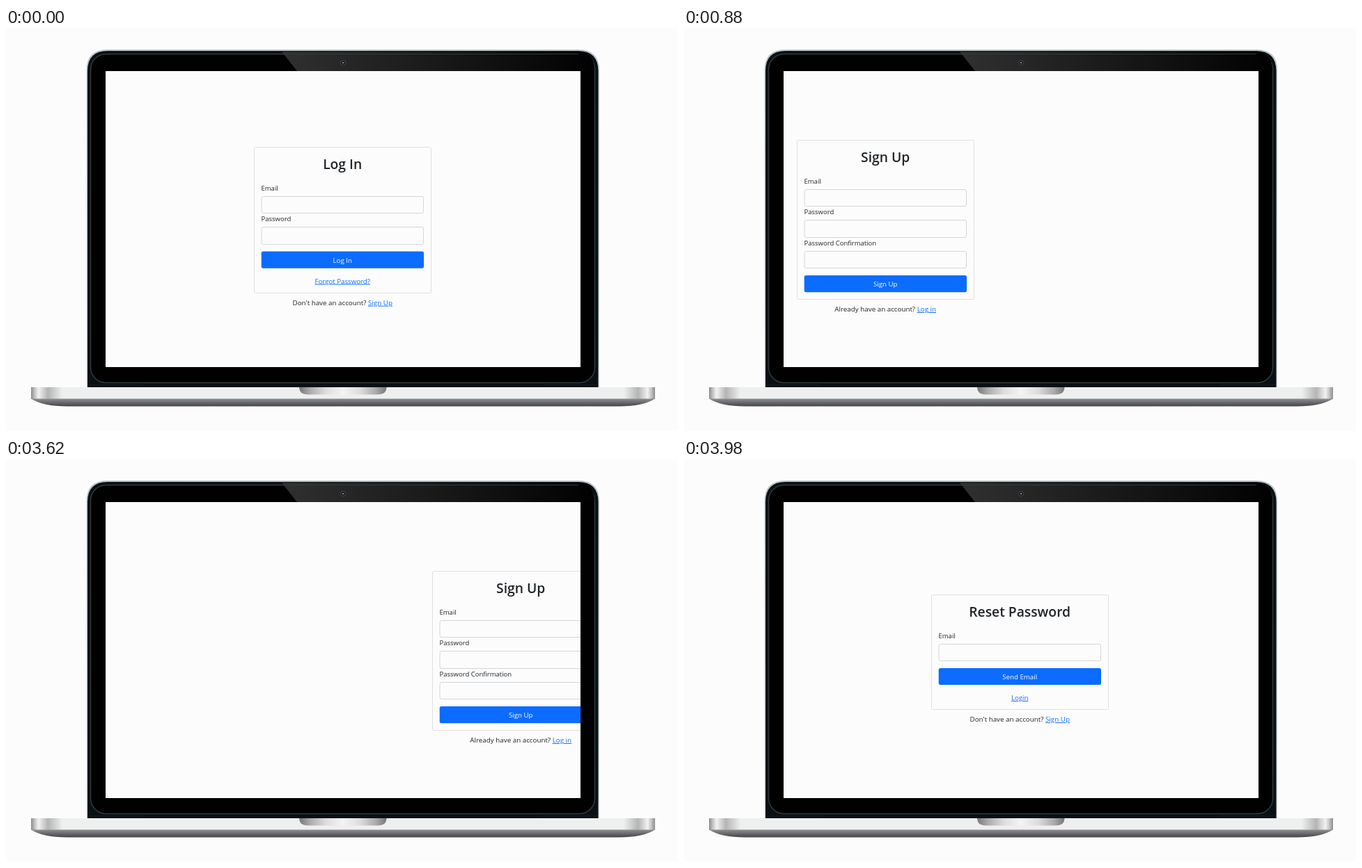
An HTML page for the animation above (6.04 s loop, 965 by 580 pixels).

```html
<!DOCTYPE html>
<html lang="en">
<head>
<meta charset="utf-8">
<title>Sign-in pages on a laptop</title>
<style>
  html, body { margin: 0; width: 100%; height: 100%; overflow: hidden; background: #fcfcfc; }
  svg { display: block; width: 965px; height: 580px; }
  text { font-family: "Open Sans", "Noto Sans", sans-serif; fill: #212529; }
  .title { font-size: 19.3px; font-weight: 600; }
  .label { font-size: 9.5px; }
  .action { font-size: 9.7px; fill: #fff; }
  .foot { font-size: 9.8px; }
  .link { font-size: 9.7px; }
  .link, .foot tspan { fill: #0d6efd; text-decoration: underline; }
  .title, .action, .foot, .link { text-anchor: middle; }
  .card { fill: none; stroke: #dfdfdf; }
  .field { fill: #fcfcfc; stroke: #d2d6da; }
  .button { fill: #0b6cff; }
</style>
</head>
<body>
<svg viewBox="0 0 965 580">
  <defs>
    <clipPath id="screen"><rect x="143" y="62" width="682" height="426"/></clipPath>
    <linearGradient id="glare">
      <stop offset="0" stop-color="#303030"/>
      <stop offset=".45" stop-color="#1b1b1b"/>
      <stop offset="1" stop-color="#010101"/>
    </linearGradient>
    <linearGradient id="edge" x1="0" y1="0" x2="0" y2="1">
      <stop offset="0" stop-color="#b9c3c3"/>
      <stop offset="1" stop-color="#d3d9dc"/>
    </linearGradient>
    <linearGradient id="deck">
      <stop offset="0" stop-color="#8c8c8c"/>
      <stop offset=".006" stop-color="#c4c4c4"/>
      <stop offset=".012" stop-color="#f2f2f2"/>
      <stop offset=".027" stop-color="#b4b4b4"/>
      <stop offset=".05" stop-color="#eeefef"/>
      <stop offset=".95" stop-color="#eeefef"/>
      <stop offset=".973" stop-color="#b4b4b4"/>
      <stop offset=".988" stop-color="#f2f2f2"/>
      <stop offset=".994" stop-color="#c4c4c4"/>
      <stop offset="1" stop-color="#8c8c8c"/>
    </linearGradient>
    <linearGradient id="under" x1="0" y1="0" x2="0" y2="1">
      <stop offset="0" stop-color="#8e8f91"/>
      <stop offset="1" stop-color="#434447"/>
    </linearGradient>
    <linearGradient id="notch">
      <stop offset="0" stop-color="#777"/>
      <stop offset=".12" stop-color="#aaa"/>
      <stop offset=".3" stop-color="#dcdcdc"/>
      <stop offset=".5" stop-color="#f4f4f4"/>
      <stop offset=".7" stop-color="#dcdcdc"/>
      <stop offset=".88" stop-color="#aaa"/>
      <stop offset="1" stop-color="#777"/>
    </linearGradient>
  </defs>

  <!-- lid -->
  <path d="M115.5 517V61Q115.5 31 145.5 31H822Q852 31 852 61V517Z" fill="url(#edge)"/>
  <path d="M117 517V62Q117 33 146 33H821.5Q850.5 33 850.5 62V517Z" fill="#0a1115"/>
  <rect x="121.5" y="37.5" width="724" height="473" rx="22" fill="#010101" stroke="#33393c" stroke-width="1.5"/>
  <path d="M396 34H822Q843 35 845 58V62H418Z" fill="url(#glare)"/>
  <path d="M146 37.5H822" stroke="#353a3c" stroke-width="1"/>
  <circle cx="484" cy="50" r="4" fill="#3a3b40"/>
  <circle cx="484" cy="50" r="2.6" fill="#15161b"/>
  <circle cx="484" cy="50" r="1.1" fill="#a4a5b0"/>
  <path d="M117 513.5H197M771 513.5H850" stroke="#10191e"/>

  <!-- base -->
  <rect x="36" y="517" width="896" height="17" fill="url(#deck)"/>
  <path d="M36 533.5H932Q915 544.5 880 544.5H88Q53 544.5 36 533.5Z" fill="url(#under)"/>
  <path d="M421 517H546.5Q546 527.5 534 527.5H433.500Q421.500 527.5 421 517Z" fill="url(#notch)"/>

  <rect x="143" y="62" width="682" height="426" fill="#fcfcfc"/>
  <g id="pages" clip-path="url(#screen)"></g>
</svg>
<script>
const LOOP = 6040, STEP = 20, STEPS = 25, UNITS = 30, TRAVEL = 965;
const SLIDES = [500, 3500];

const snap = v => Math.floor(v) + 0.5;
const text = (cls, x, y, str) => `<text class="${cls}" x="${x}" y="${y}">${str}</text>`;
const outline = (cls, x, y, w, bottom) =>
  `<rect class="${cls}" x="${x + 0.5}" y="${snap(y)}" width="${w}" height="${snap(bottom) - snap(y)}" rx="2.5"/>`;

function page({ left, top, title, fields, action, link, foot, footLink }) {
  const inner = left + 10.5, mid = left + 127.2;
  const buttonTop = top + 60.9 + 44.6 * fields.length;
  const bottom = buttonTop + (link ? 60 : 34.8);
  const rows = fields.map((name, i) => {
    const y = top + 44.6 * i;
    return text("label", inner, y + 62.3, name) +
      outline("field", left + 10.5, y + 70.8, 232.5, y + 95.2);
  });
  return `<g>${outline("card", left, top, 254, bottom)}
    ${text("title", mid, top + 31.4, title)}
    ${rows.join("")}
    <rect class="button" x="${inner + 0.2}" y="${buttonTop}" width="233.3" height="24.2" rx="2.5"/>
    ${text("action", mid, buttonTop + 16.1, action)}
    ${link ? text("link", mid, buttonTop + 46, link) : ""}
    ${text("foot", mid, bottom + 17.2, `${foot} <tspan>${footLink}</tspan>`)}</g>`;
}

const layer = document.getElementById("pages");
layer.innerHTML = [
  { left: 356, top: 171.4, title: "Log In", fields: ["Email", "Password"], action: "Log In",
    link: "Forgot Password?", foot: "Don't have an account?", footLink: "Sign Up" },
  { left: 355, top: 161.3, title: "Sign Up", fields: ["Email", "Password", "Password Confirmation"],
    action: "Sign Up", foot: "Already have an account?", footLink: "Log in" },
  { left: 355, top: 195.4, title: "Reset Password", fields: ["Email"], action: "Send Email",
    link: "Login", foot: "Don't have an account?", footLink: "Sign Up" }
].map(page).join("");
const pages = [...layer.children];

// Linear push to the right, advancing in whole units.
function progress(t, start) {
  const step = Math.floor((t - start) / STEP) + 1;
  const clamped = Math.max(0, Math.min(STEPS, step));
  return Math.round(clamped * UNITS / STEPS) / UNITS;
}

function render(t) {
  const moved = SLIDES.reduce((sum, start) => sum + progress(t, start), 0);
  pages.forEach((el, i) => {
    const x = Math.round((moved - i) * TRAVEL);
    el.setAttribute("transform", `translate(${x} 0)`);
    el.setAttribute("visibility", Math.abs(x) < TRAVEL ? "visible" : "hidden");
  });
}

const begin = performance.now();
function tick() {
  render((performance.now() - begin) % LOOP);
  requestAnimationFrame(tick);
}
tick();
</script>
</body>
</html>
```
